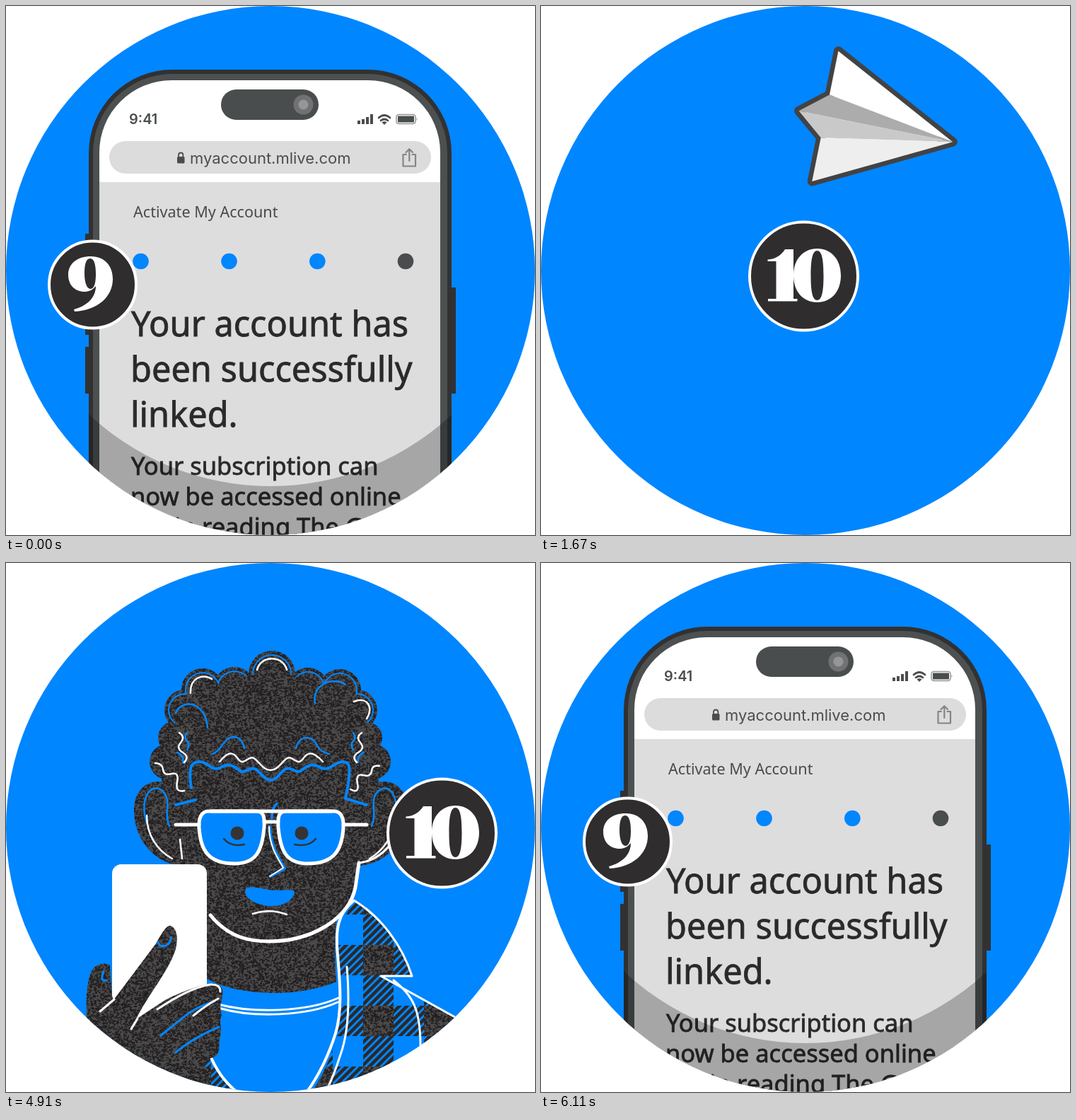
An HTML page that plays this animation: 748x748 px, repeating every 8000 ms.

```html
<!DOCTYPE html>
<html lang="en">
<head>
<meta charset="utf-8">
<title>Account linked</title>
<style>
  html, body { margin: 0; width: 100%; height: 100%; overflow: hidden; background: #fff; }
  svg { display: block; width: 100vw; height: 100vh; }
  .line { fill: none; stroke-linecap: round; stroke-linejoin: round; }
  .white { stroke: #fff; }
  .blue { stroke: #0086ff; }
  .sky { fill: #0086ff; }
  .grain { fill: url(#grain); }
  .ui { font-family: Inter, "Liberation Sans", sans-serif; fill: #4a4d4e; }
  .copy { font-family: "Noto Sans", "Open Sans", sans-serif; fill: #2b2a2b; }
  .medium { stroke: #2b2a2b; stroke-width: .8; }
  .badge circle { fill: #2f2d2e; stroke: #fff; stroke-width: 4; }
  .badge path { fill: #fff; fill-rule: evenodd; }
</style>
</head>
<body>
<svg viewBox="0 0 748 748">
  <defs>
    <clipPath id="disc"><circle cx="374" cy="374" r="374"/></clipPath>
    <clipPath id="body"><rect id="bodyShape" x="117" y="90" width="513" height="1057" rx="118"/></clipPath>
    <pattern id="grain" width="256" height="256" patternUnits="userSpaceOnUse">
      <rect width="256" height="256" fill="#4b4a4b"/>
      <path id="specks" fill="#231f20"/>
    </pattern>
    <pattern id="plaid" x="462" y="540" width="86" height="86" patternUnits="userSpaceOnUse">
      <path id="stripes" stroke="#2b292a" stroke-width="4.6" clip-path="url(#stripedCells)"/>
      <rect x="43" width="43" height="43" fill="#4b4a4b"/>
      <path id="plaidSpecks" fill="#231f20" clip-path="url(#solidCell)"/>
    </pattern>
    <clipPath id="stripedCells"><path d="M0 0H43V43H86V86H43V43H0Z"/></clipPath>
    <clipPath id="solidCell"><path d="M43 0H86V43H43Z"/></clipPath>
  </defs>

  <g clip-path="url(#disc)">
    <rect class="sky" width="748" height="748"/>

    <g id="man">
      <!-- jacket -->
      <path fill="url(#plaid)" d="M468 520L492 477C530 500 560 540 574 584H530L640 645L760 760H425C445 730 468 690 472 640C475 600 470 560 468 520ZM285 690Q300 725 327 750H240Z"/>
      <!-- ears, neck, face -->
      <path class="grain" d="M252 330C225 295 180 305 181 352C182 395 215 428 252 428ZM497 330C524 295 569 305 568 352C567 395 534 428 497 428Z"/>
      <path class="grain" d="M284 480H470C464 520 465 560 467 592C420 613 335 615 284 588Z"/>
      <path class="grain" d="M236 290L250 425C255 470 270 500 290 505C310 530 345 536 372 536C430 536 485 505 495 458L502 412L512 290Z"/>
      <g id="hair"></g>
      <path class="grain" d="M250 190L300 172L376 150L450 172L500 195L518 250L522 300L495 335H250L226 300L232 250Z"/>
      <g class="line blue" stroke-width="2.5">
        <path d="M240 212C248 192 282 194 285 233M437 198C432 172 462 160 480 172M292 270C305 266 308 245 323 246Q334 247 337 262M410 262C414 243 434 242 441 260Q445 267 457 270"/>
        <path d="M256 240q-5 7 0 12t0 12M242 268q10 4 8 14M491 240q5 7 0 12t0 12M506 268q-10 4-8 14"/>
        <path d="M199 368C188 330 206 310 221 322C236 336 222 352 231 372M549 368C558 330 542 310 527 322C512 336 526 352 517 372"/>
        <path stroke-width="4" d="M268 335L240 342M262 318C258 292 260 280 275 281C287 283 290 294 302 290C316 282 320 286 330 293C338 300 345 286 354 292C362 299 367 307 374 307C382 307 386 299 394 292C403 286 410 300 418 293C428 286 432 282 446 290C458 294 463 283 475 281C488 280 487 292 483 318L480 333L510 342"/>
      </g>
      <g class="line white" stroke-width="2.5">
        <path d="M261 184C260 162 278 156 291 164M355 151C360 130 392 130 397 151M492 196C512 188 520 206 510 220"/>
        <path d="M302 281C316 264 322 268 329 278C337 288 343 270 352 277C360 284 365 293 374 293C383 293 388 284 396 277C405 270 411 288 419 278C426 268 432 264 448 281"/>
        <path d="M245 240q9 6 2 14t3 14t2 14M503 240q-9 6-2 14t-3 14t-2 14M211 283q10 0 11 9t12 6t8 12t10 12M528 287q-10-2-11 7t-12 6t-8 12t-10 8"/>
        <path d="M199 357C199 384 213 406 235 418M246 391L249 418M550 357C549 384 535 406 514 418"/>
      </g>
      <path class="line white" stroke-width="5" d="M289 498C315 530 345 535 372 535C430 535 484 505 494 459L499 424"/>
      <path class="line white" stroke-width="3" d="M500 424Q527 420 545 396"/>

      <!-- glasses, eyes, nose, mouth -->
      <path class="line blue" stroke-width="3.5" d="M383 340Q375 348 376 361"/>
      <g class="sky" stroke="#fff" stroke-width="5">
        <path d="M286 351H354C364 351 366 358 365 374C362 407 354 425 323 425C285 425 275 405 273 374C272 360 277 351 286 351Z"/>
        <path d="M464 351H396C386 351 384 358 385 374C388 407 396 425 427 425C465 425 475 405 477 374C478 360 473 351 464 351Z"/>
      </g>
      <path class="line white" stroke-width="5" d="M240 370H273M477 370H510M365 366H385M290 351H460"/>
      <g fill="#353334"><circle cx="327" cy="382" r="9.5"/><circle cx="418" cy="382" r="9.5"/></g>
      <path class="line" stroke="#353334" stroke-width="2.5" d="M308 390Q318 402 337 398M408 398Q428 402 438 390"/>
      <path class="line blue" stroke-width="4" d="M373 373C374 402 388 420 394 432L374 443"/>
      <path class="line white" stroke-width="2" d="M372 373C372 402 386 420 392 431L373 443"/>
      <path class="sky" d="M338 465C337 455 352 458 372 462C391 465 408 458 408 467C404 479 391 486 372 485C352 483 340 475 338 465Z"/>
      <path class="line white" stroke-width="2.5" d="M349 496Q373 488 397 497"/>

      <!-- shirt and jacket edges -->
      <g class="line white" stroke-width="3">
        <path d="M300 624C350 637 425 635 470 615M304 630C350 643 425 641 469 621"/>
        <path stroke-width="4" d="M490 479C467 497 466 525 469 555C473 600 475 635 466 665C455 700 440 728 424 750M286 690C297 718 310 735 329 750"/>
        <path d="M482 571C486 620 484 665 473 695Q463 727 451 750M492 477C530 500 560 540 574 584H530L640 645M548 590C575 612 587 630 586 690"/>
      </g>

      <!-- phone and hand -->
      <rect x="150" y="426" width="134" height="260" rx="13" fill="#fff"/>
      <path class="grain" d="M152 618L212 538C222 520 228 511 233 513C244 518 243 536 239 549C228 580 200 612 184 645L225 618C250 605 275 597 292 594C303 594 308 602 306 612L303 628L305 640C300 650 306 655 303 668C300 680 304 690 297 697C290 702 280 698 275 720L290 760H100L114 640C113 615 114 590 122 575C128 566 145 564 147 570L150 612Z"/>
      <path class="line blue" stroke-width="3" d="M215 536Q217 544 226 541Q233 538 233 529M219 668C245 648 260 630 294 620M240 692C260 675 280 665 301 656M138 578Q132 592 142 590"/>
      <path class="line white" stroke-width="3" d="M177 659L186 644M214 631C250 607 275 598 289 596Q303 595 303 606M265 640Q283 625 300 616M133 634L153 617"/>
    </g>

    <g id="ten" class="badge" role="img" aria-label="10">
      <circle cx="371.500" cy="382" r="76.500"/>
      <path d="M320.500 358.500C332 358 340 352 345 344H357V414H362.500V417.500H321V414H332.500V361H320.500Z"/>
      <path d="M390.500 343C410 343 424 358 424 381S410 419 390.500 419S357 404 357 381S371 343 390.500 343ZM390.500 346C384 346 381.500 358 381.500 381S384 416 390.500 416S399.500 404 399.500 381S397 346 390.500 346Z"/>
    </g>

    <g id="phone">
      <path fill="#323132" d="M112 322h10v38h-10zM112 399h10v66h-10zM112 482h10v66h-10zM624 398h12v150h-12z"/>
      <rect x="117" y="90" width="513" height="1057" rx="118" fill="#323132"/>
      <rect x="123" y="96" width="501" height="1042" rx="112" fill="#4c5050"/>
      <rect x="132" y="105" width="482" height="1028" rx="102" fill="#fff"/>
      <rect x="304" y="118" width="138" height="43" rx="21.500" fill="#4a4d4e"/>
      <circle cx="420.500" cy="139.500" r="14" fill="#707273"/>
      <circle cx="420.500" cy="139.500" r="7" fill="#959697"/>
      <text class="ui" x="174" y="167" font-size="20" font-weight="600">9:41</text>
      <path fill="#4a4d4e" d="M497 162h4v5h-4zM503 160h4v7h-4zM509 157h4v10h-4zM515 153h4v14h-4z"/>
      <path class="line" stroke="#4a4d4e" stroke-width="2.700" d="M527 158q8-7 16 0M530 162q5-4 10 0"/>
      <path fill="#4a4d4e" d="M531.500 164.500q3.500-2.500 7 0l-3.500 3.500z"/>
      <rect x="552" y="153.500" width="27" height="13" rx="3.500" fill="none" stroke="#939595" stroke-width="1.500"/>
      <path fill="#4a4d4e" d="M554 155.500h23v9h-23z"/>
      <path fill="#939595" d="M580.500 158q2 2 0 4z"/>
      <rect x="146" y="191" width="455" height="46" rx="23" fill="#dcdcdc"/>
      <rect x="242" y="213" width="10.500" height="9.500" rx="1.500" fill="#4a4d4e"/>
      <path class="line" stroke="#4a4d4e" stroke-width="1.800" d="M244 213v-2q0-3.500 3.200-3.500t3.200 3.500v2"/>
      <text class="ui" x="260" y="223" font-size="22">myaccount.mlive.com</text>
      <path class="line" stroke="#858585" stroke-width="2.200" d="M566 210h-4.500v16.500h17.500v-16.500h-4.500M570.300 219v-16M565.500 207l4.800-4.800l4.800 4.800"/>
      <path fill="#ddd" d="M132 249h482v782h-482z"/>
      <path fill="#c4c4c4" d="M132 1031h482v1.500h-482z"/>
      <text class="copy" x="180" y="299" font-size="21.600" style="fill:#4a4a4a">Activate My Account</text>
      <g class="sky"><circle cx="190.500" cy="361" r="11.300"/><circle cx="315.500" cy="361" r="11.300"/><circle cx="440.300" cy="361" r="11.300"/></g>
      <circle cx="565" cy="361" r="11.300" fill="#4a4d4e"/>
      <g class="copy medium" font-size="48.700">
        <text x="177" y="467">Your account has</text>
        <text x="176" y="531">been successfully</text>
        <text x="176" y="595">linked.</text>
      </g>
      <g class="copy medium" font-size="34.500">
        <text x="177" y="663">Your subscription can</text>
        <text x="176" y="706">now be accessed online</text>
        <text x="176" y="749">begin reading The Gable</text>
      </g>
      <circle cx="374" cy="1062" r="23" fill="#e8e8e8"/>
      <g class="line" stroke="#7d7d7d" stroke-width="4">
        <path d="M258 1062h29M277 1051l11 11l-11 11M361 1062h26M374 1049v26"/>
        <rect x="461" y="1047" width="30" height="30" rx="12"/>
      </g>
      <text class="ui" x="476" y="1068" font-size="17" font-weight="700" text-anchor="middle" style="fill:#7d7d7d">4</text>
      <rect x="288" y="1117" width="172" height="6" rx="3" fill="#4a4d4e"/>
    </g>

    <!-- fixed shade that falls on the passing phone -->
    <g clip-path="url(#body)">
      <path fill="#000" fill-opacity=".25" d="M-1 304a375 375 0 0 0 750 0V748H-1Z"/>
    </g>

    <g id="nine" class="badge" role="img" aria-label="9">
      <circle cx="122.500" cy="394" r="61.500"/>
      <path d="M120 354C140 354 151 368 151 386C151 411 130 430 97 432L96 429C115 424 127 412 127 396C122 402 117 404 111 404C98 404 88 395 88 380C88 364 101 354 120 354ZM119 357C113 357 111 366 111 378S114 400 119.500 400S127 391 127 379S125 357 119 357Z"/>
    </g>

    <g id="plane">
      <path d="M92 0L-92-94V-31L-130 0L-92 31V94Z" fill="#fff" stroke="#434244" stroke-width="13" stroke-linejoin="round"/>
      <path d="M92 0L-92-94V-31Z" fill="#fff"/>
      <path d="M92 0L-92-31L-130 0Z" fill="#acacac"/>
      <path d="M92 0L-130 0L-92 31Z" fill="#c9c9c9"/>
      <path d="M92 0L-92 31V94Z" fill="#eee"/>
    </g>
  </g>
</svg>

<script>
const LOOP = 8000, STEP = 30;
const $ = id => document.getElementById(id);

// Seeded grain for the portrait
let seed = 7;
const random = () => (seed = (seed * 16807) % 2147483647) / 2147483647;
function specks(size) {
  let d = '';
  for (let i = 0; i < size * size * .18; i++) {
    const w = (1 + random() * 2.4).toFixed(1), h = (1 + random() * 1.6).toFixed(1);
    d += `M${(random() * size).toFixed(1)} ${(random() * size).toFixed(1)}h${w}v${h}h-${w}z`;
  }
  return d;
}
$('specks').setAttribute('d', specks(256));
$('plaidSpecks').setAttribute('d', specks(86));

let lines = '';
for (let x = 0; x < 180; x += 86 / 8) lines += `M${x} -2l-92 92`;
$('stripes').setAttribute('d', lines);

// Curls: a thin blue line runs just inside the upper ones
const curls = [
  [376, 157, 33], [323, 177, 30], [427, 177, 29], [278, 179, 30], [472, 180, 30],
  [253, 208, 29], [496, 208, 29], [238, 247, 23], [510, 247, 22],
  [228, 281, 25], [519, 281, 25], [243, 304, 23], [504, 304, 23]
];
const ring = (list, inset, paint) => list.map(([x, y, r]) =>
  `<circle cx="${x}" cy="${y}" r="${r - inset}" class="${paint}"/>`).join('');
const upper = curls.slice(0, 7);
$('hair').innerHTML = ring(curls, 0, 'grain') + ring(upper, 5, 'sky') + ring(upper, 7, 'grain');

// time, x, y, heading
const flight = [
  [500, 850, 415, -180], [800, 650, 422, -178], [1000, 445, 420, -168],
  [1120, 322, 362, -140], [1250, 259, 255, -103.8], [1450, 300, 108, -55],
  [1560, 390, 118, -22], [1670, 492, 174, 11.4], [1770, 552, 245, 55],
  [1860, 515, 335, 110], [1960, 385, 375, 155], [2090, 210, 388, 172],
  [2300, 75, 392, 178], [2630, -145, 396, 180]
];

function slope(i, k) {
  const a = flight[Math.max(i - 1, 0)], b = flight[Math.min(i + 1, flight.length - 1)];
  return (b[k] - a[k]) / (b[0] - a[0]);
}

function flightAt(t) {
  const last = flight.length - 1;
  if (t <= flight[0][0]) return flight[0].slice(1);
  if (t >= flight[last][0]) return flight[last].slice(1);
  const i = flight.findIndex(p => p[0] > t) - 1;
  const a = flight[i], b = flight[i + 1], d = b[0] - a[0], u = (t - a[0]) / d;
  return [1, 2, 3].map(k =>
    (1 + 2 * u) * (1 - u) ** 2 * a[k] + u * (1 - u) ** 2 * d * slope(i, k) +
    u * u * (3 - 2 * u) * b[k] + u * u * (u - 1) * d * slope(i + 1, k));
}

function ease(t, from, to) {
  const u = Math.min(1, Math.max(0, (t - from) / (to - from)));
  return u < .5 ? .5 * (2 * u) ** 2.5 : 1 - .5 * (2 - 2 * u) ** 2.5;
}

// Whole pixels keep the grain crisp
const move = (id, x, y) =>
  $(id).setAttribute('transform', `translate(${Math.round(x)} ${Math.round(y)})`);

function draw(t) {
  const opening = t < 3000;
  const drop = ease(t, 940, 1650), rise = ease(t, 1670, 2090), back = ease(t, 5400, 6110);
  const phoneY = opening ? 660 * drop : -1170 * (1 - back);
  move('phone', 0, phoneY);
  move('bodyShape', 0, phoneY);
  move('nine', 0, opening ? 700 * drop : -520 * (1 - back));
  move('man', 0, 627 * (opening ? 1 - rise : back));
  move('ten', 245 * (opening ? rise : 1 - ease(t, 5400, 5939)), 0);
  const [x, y, heading] = flightAt(t);
  $('plane').setAttribute('transform', `translate(${x} ${y}) rotate(${heading})`);
}

// Poses change in even steps, the first move falling on 500 ms
const snap = t => Math.floor((t - 15) / STEP) * STEP + 20;

const start = performance.now();
function tick() {
  draw(snap((performance.now() - start) % LOOP));
  requestAnimationFrame(tick);
}
tick();
</script>
</body>
</html>
```
